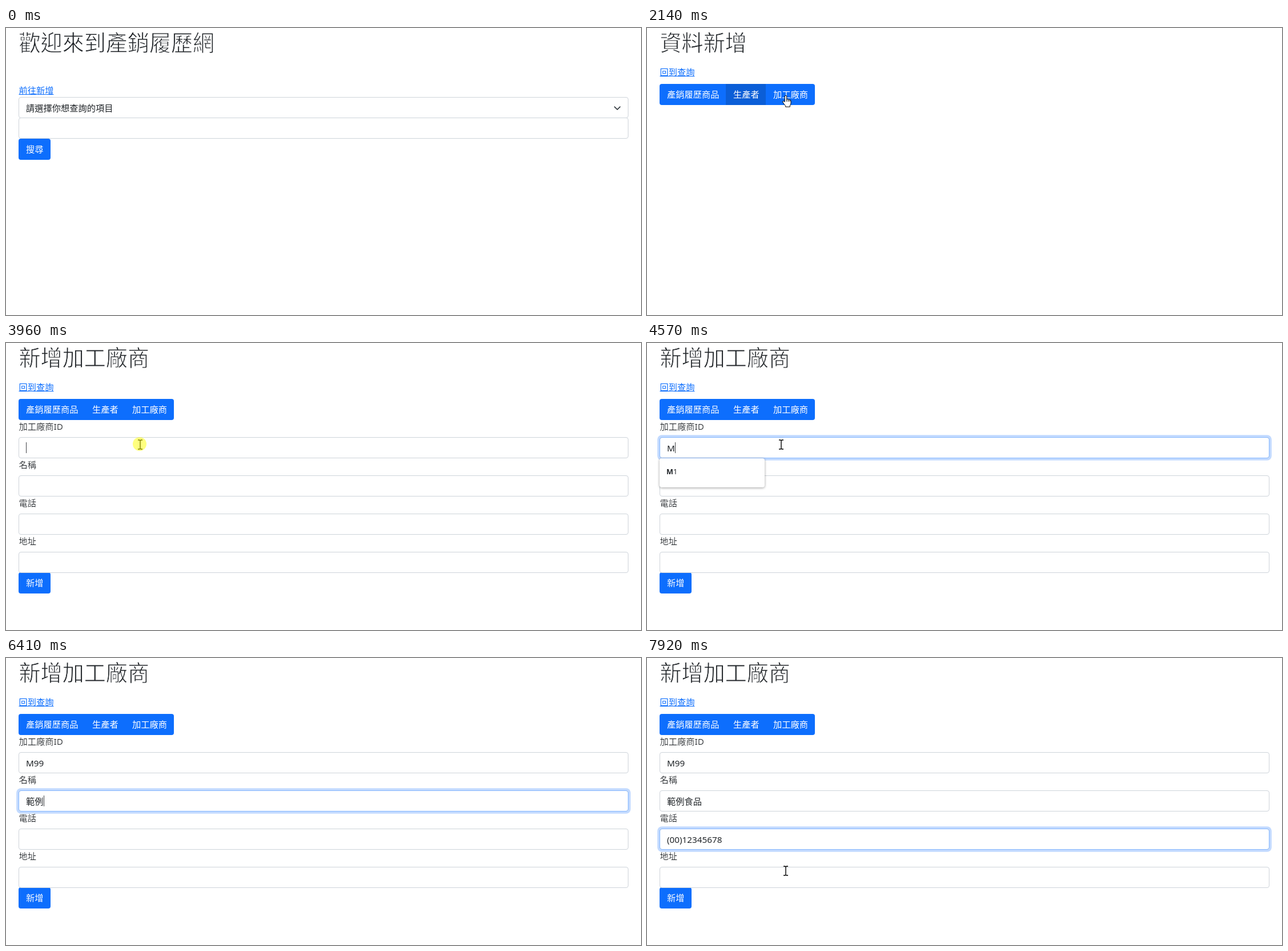
Write an HTML page that moves like this. It is 1112 px wide and 503 px high and loops after 8000 ms.

```html
<!DOCTYPE html>
<html lang="zh-Hant">
<head>
<meta charset="utf-8">
<title>產銷履歷網</title>
<style>
html, body { margin: 0; width: 100%; height: 100%; overflow: hidden; background: #fff; }
body { position: relative; color: #212529; font: 300 15.25px/24px "Noto Sans", "Noto Sans CJK TC", "Noto Sans CJK", sans-serif; }
body *, body *::before { position: absolute; box-sizing: border-box; white-space: pre; }
.page { inset: 0; visibility: hidden; }
.page.on { visibility: visible; }
/* A white outline thins the heavy strokes. */
h1 { left: 22.5px; top: 1px; margin: 0; font-size: 38.1px; line-height: 48px; font-weight: 300; -webkit-text-stroke: .9px #fff; }
.link { left: 22.5px; color: #0d6efd; text-decoration: underline; text-decoration-skip-ink: none; }
.label { left: 22.5px; -webkit-text-stroke: .2px #fff; }
.field { left: 22px; width: 1068px; height: 37px; border: 1px solid #ced4da; border-radius: 4px; background: #fff; }
.text { left: 12px; top: 5.5px; }
.latin { font-weight: 400; }
.caret { left: 12px; top: 8px; width: 1px; height: 19px; background: #212529; }
.ring { inset: -1px; border: 1px solid #86b7fe; border-radius: 4px; box-shadow: 0 0 0 3.8px rgba(13, 110, 253, .25); opacity: 0; }
.btn { left: 22px; width: 56px; height: 37px; border-radius: 4px; background: #0d6efd; color: #fff; line-height: 37px; padding-left: 13px; overflow: hidden; isolation: isolate; }
.btn::before { content: ""; inset: 0; background: #0b5ed7; opacity: var(--h, 0); z-index: -1; }
.group { left: 0; top: 98px; }
.group .btn { top: 0; border-radius: 0; }
.group .btn:first-child { width: 116px; border-radius: 4px 0 0 4px; }
.group .btn:nth-child(2) { left: 138px; width: 70px; }
.group .btn:last-child { left: 208px; width: 86px; border-radius: 0 4px 4px 0; }
.chevron { left: 1041px; top: 11.5px; width: 13px; height: 13px; fill: none; stroke: #343a40; stroke-width: 2; stroke-linecap: round; stroke-linejoin: round; }
#drop { left: 22px; width: 184px; height: 51px; padding-left: 12px; border-radius: 4px; background: #fff; box-shadow: 0 1px 4px rgba(0, 0, 0, .38); font-size: 12.6px; line-height: 48px; font-weight: 400; }
#drop b { position: static; font-weight: 700; }
#status { left: -1px; top: 486px; height: 24px; padding: 0 7px 0 0; border-radius: 0 4px 0 0; background: #dee1e6; color: #565b60; font: 400 11.4px/24px "Noto Sans", sans-serif; }
#mouse { left: 0; top: 0; }
#mouse svg { left: 0; top: 0; overflow: visible; width: 1px; height: 1px; display: none; }
#mouse svg.on { display: block; }
#spot { left: -13px; top: -13px; width: 24px; height: 24px; border-radius: 50%; background: rgba(255, 255, 0, .5); }
</style>
</head>
<body>
<div class="page">
  <h1>歡迎來到產銷履歷網</h1>
  <span class="link" id="go" style="top:97px">前往新增</span>
  <div class="field" style="top:121px"><span class="text">請選擇你想查詢的項目</span>
    <svg class="chevron" viewBox="0 0 16 16"><path d="M2 5l6 6 6-6"/></svg></div>
  <div class="field" style="top:157px"></div>
  <div class="btn" style="top:193.5px">搜尋</div>
</div>
<div class="page">
  <h1>資料新增</h1>
</div>
<div class="page" id="form">
  <h1>新增加工廠商</h1>
  <div class="btn" style="top:402px">新增</div>
</div>
<div class="page" id="nav">
  <span class="link" style="top:65px">回到查詢</span>
  <div class="group"><div class="btn">產銷履歷商品</div><div class="btn">生產者</div><div class="btn">加工廠商</div></div>
</div>
<div id="drop"></div>
<div id="status"></div>
<div id="mouse">
  <svg id="arrow"><path d="M0 0V16L3.7 12.5L6.2 18.3L8.6 17.2L6.2 11.6H11.3Z" fill="#fff" stroke="#000"/></svg>
  <svg id="beam"><path d="M-4 -8H-1.2L0 -7L1.2 -8H4M0 -7V7M-4 8H-1.2L0 7L1.2 8H4" fill="none" stroke="#000" stroke-width="1.4"/></svg>
  <svg id="hand"><path d="M-1.7 10.5V1Q-1.7 -.6 0 -.6T1.7 1V6Q3.2 4.8 4.4 6.4Q5.8 5.4 6.9 7.1Q9 6.6 9 9V12.5Q9 15 7.3 17V19.2H-.4V17.5Q-3 14.5 -5.2 11Q-6 9.2 -4.2 9Q-2.8 9.1 -1.7 10.5Z" fill="#fff" stroke="#000"/><path d="M1.7 6V10M4.4 6.6V10M6.9 7.2V10" stroke="#000"/></svg>
  <div id="spot"></div>
</div>
<script>
const $ = id => document.getElementById(id);
const LOOP = 8000, FADE = 150;

// Bursts of screen updates: start, end, number of steps.
const bursts = [
  [120, 920, 11], [990, 1450, 7], [1680, 2450, 11], [2850, 3000, 3], [3230, 3790, 8],
  [3960, 4090, 3], [4490, 4570, 2], [4800, 4800, 1], [5260, 5260, 1], [5740, 5960, 4],
  [6190, 6410, 4], [6580, 7340, 11], [7420, 7750, 5], [7920, 7920, 1]
];

// Pointer keys: time, x, y, shape.
const path = [
  [0, 1030, 478, ''], [120, 1030, 478, 'arrow'], [520, 480, 250, 'arrow'], [680, 255, 175, 'beam'],
  [760, 160, 140, 'arrow'], [840, 95, 110, 'hand'], [920, 72, 103, 'hand'], [1450, 72, 103, 'arrow'],
  [1680, 74, 105, 'hand'], [1911, 130, 115, 'hand'], [2142, 243, 119, 'hand'], [3230, 243, 119, 'hand'],
  [3384, 242, 133, 'hand'], [3460, 240, 150, 'arrow'], [3537, 237, 168, 'beam'], [3790, 235, 178, 'beam'],
  [5300, 235, 178, 'beam'], [5740, 230, 215, 'beam'], [5813, 228, 247, 'beam'], [6263, 228, 247, ''],
  [6808, 200, 275, 'beam'], [6960, 155, 317, 'beam'], [7400, 155, 317, 'beam'],
  [7750, 248, 368, 'beam'], [7920, 243, 373, 'beam']
];
const clicks = [[1140, 1300], [2850, 2920], [3960, 4020], [5800, 5870], [7030, 7100]];

const fields = [
  { label: '加工廠商ID', value: 'M99', typed: [4490, 4800, 5260], focus: [3960, 5813], caret: [3960, 5800], latin: true,
    hint: 'M1', drop: [4020, 4800] },
  { label: '名稱', value: '範例食品', typed: [6190, 6330, 6580, 6730], focus: [5813, 6884], caret: [5800, 7030],
    hint: '霧杉食品', drop: [5800, 6260] },
  { label: '電話', value: '(00)12345678', typed: Array.from({ length: 12 }, (_, i) => 7180 + i * 51), focus: [7036, LOOP + FADE], caret: [7030, 7900], latin: true,
    hint: '(00)55501437', drop: [7030, 7500] },
  { label: '地址', value: '', typed: [], focus: [LOOP, LOOP], caret: [LOOP, LOOP], drop: [LOOP, LOOP] }
];

function add(parent, cls, text = '') {
  const el = document.createElement('div');
  el.className = cls;
  el.textContent = text;
  return parent.appendChild(el);
}

fields.forEach((f, i) => {
  f.top = Math.round(165 + i * 66.9);
  add($('form'), 'label', f.label).style.top = f.top - 31 + 'px';
  const box = add($('form'), 'field');
  box.style.top = f.top + 'px';
  f.ring = add(box, 'ring');
  f.text = add(box, f.latin ? 'text latin' : 'text');
  f.bar = add(box, 'caret');
});

const pages = document.querySelectorAll('.page');
const tabs = document.querySelectorAll('.group .btn');
const hovers = [[1680, 1911], [1988, 2142], [2142, 3460]];
const within = (t, [a, b]) => t >= a && t < b;
const clamp = v => Math.min(1, Math.max(0, v));
const fade = (t, [a, b]) => clamp((t - a) / FADE) * (1 - clamp((t - b) / FADE));

function snap(t) {
  const b = bursts.filter(b => t >= b[0]).pop();
  if (!b) return 0;
  const [start, end, n] = b;
  if (n === 1) return start;
  const step = (end - start) / (n - 1);
  return Math.min(end, start + Math.floor((t - start + 14) / step) * step);
}

function drawMouse(t) {
  const i = path.filter(k => t >= k[0] - 1).length - 1;
  const a = path[i], b = path[i + 1] || a;
  const u = b === a ? 0 : clamp((t - a[0]) / (b[0] - a[0]));
  const x = a[1] + (b[1] - a[1]) * u, y = a[2] + (b[2] - a[2]) * u;
  $('mouse').style.transform = `translate(${x}px, ${y}px)`;
  for (const id of ['arrow', 'beam', 'hand']) $(id).classList.toggle('on', id === a[3]);
  $('spot').style.opacity = clicks.some(c => within(t, c)) ? 1 : 0;
}

function drawField(f, t) {
  const n = f.typed.filter(k => t >= k).length;
  f.text.textContent = f.value.slice(0, n);
  f.bar.style.opacity = within(t, f.caret) ? .85 : 0;
  f.bar.style.left = 12 + (n ? f.text.getBoundingClientRect().width + .5 : 0) + 'px';
  f.ring.style.opacity = fade(t, f.focus);
  if (!within(t, f.drop)) return;
  const drop = $('drop'), bold = document.createElement('b');
  bold.textContent = f.hint.startsWith(f.value.slice(0, n)) ? f.hint.slice(0, n) : '';
  drop.replaceChildren(bold, f.hint.slice(bold.textContent.length));
  drop.style.top = f.top + 36.5 + 'px';
  drop.style.visibility = 'visible';
}

function draw(time) {
  const t = snap(time % LOOP);
  const page = t < 1449 ? 0 : t < 2999 ? 1 : 2;
  pages.forEach((p, i) => p.classList.toggle('on', i === page || (i === 3 && page > 0)));
  $('go').style.color = t > 900 ? '#0a58ca' : '#0d6efd';
  tabs.forEach((b, i) => b.style.setProperty('--h', fade(t, hovers[i])));
  $('status').textContent = '8000/basic_query/create' + (t > 2200 ? '/factory' : '');
  $('status').style.opacity = Math.max(fade(t, [950, 1700]), fade(t, [2220, 3480]));
  $('drop').style.visibility = 'hidden';
  fields.forEach(f => drawField(f, t));
  drawMouse(t);
}

const begin = performance.now();
(function tick() {
  draw(performance.now() - begin);
  requestAnimationFrame(tick);
})();
</script>
</body>
</html>
```
